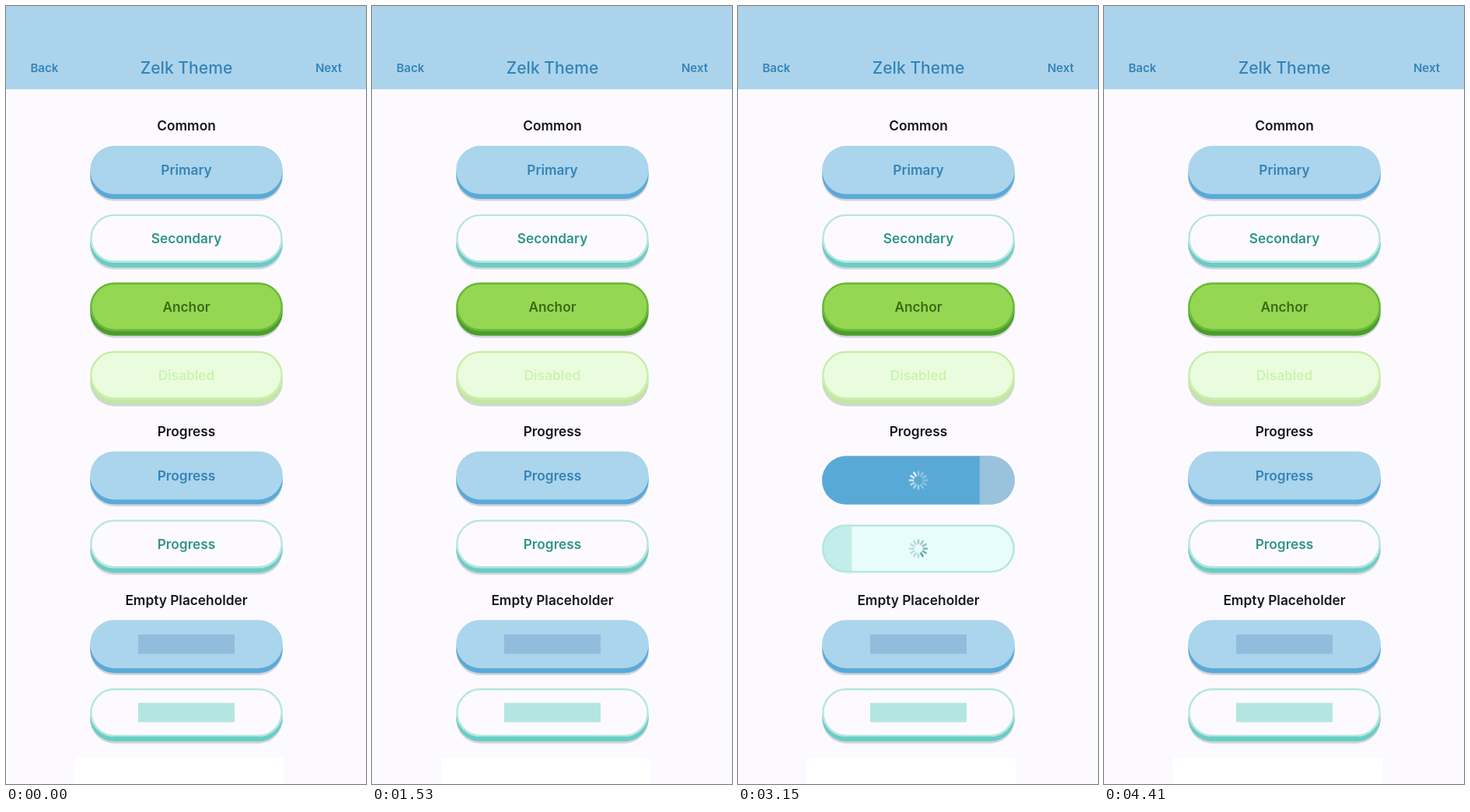
Animation, 463 px wide and 1000 px high, one loop 4.44 s. Source, as an HTML page:

```html
<!DOCTYPE html>
<html lang="en">
<head>
<meta charset="utf-8">
<title>Button theme</title>
<style>
@property --press { syntax: "<number>"; inherits: true; initial-value: 0; }
@property --label { syntax: "<number>"; inherits: true; initial-value: 1; }

html, body { margin: 0; width: 100%; height: 100%; overflow: hidden; background: #fcfafe; }
svg { display: block; width: 100%; height: 100%; }
text { font: 600 17.3px Inter, "Open Sans", sans-serif; text-anchor: middle; }
.nav { fill: #3583b8; font-size: 15px; }
.title { font-size: 21.1px; font-weight: 500; }
.heading { fill: #17171b; }

.tap { animation: tap 4440ms var(--at) infinite; }
.hold { animation: hold 4440ms var(--at) infinite, label 4440ms var(--at) linear infinite; }

.face { transform: translateY(calc(var(--press) * 6.2px)); }
.shade { transform: translateY(calc(var(--press) * -2.6px)); }
.tint { opacity: var(--press); }
.label { transform: scale(var(--label)); opacity: var(--label); }
.bar { opacity: 0; transform: scaleX(0); animation: fill 4440ms var(--at) linear infinite; }
.spinner { opacity: 0; animation: show 4440ms var(--at) linear infinite; }
.spokes { animation: spin 4440ms var(--at) steps(54) infinite; }

@keyframes tap {
  0% { --press: 0; animation-timing-function: ease-out; }
  2.03%, 3.38% { --press: 1; animation-timing-function: ease-out; }
  5.86%, 100% { --press: 0; }
}
@keyframes hold {
  0% { --press: 0; animation-timing-function: ease-out; }
  2.03%, 38.74% { --press: 1; animation-timing-function: ease-out; }
  42.8%, 100% { --press: 0; }
}
@keyframes label {
  0%, 3.15% { --label: 1; }
  6.53%, 30.4% { --label: 0; }
  34.23% { --label: 1.07; }
  36.5% { --label: .985; }
  38.3%, 100% { --label: 1; }
}
@keyframes fill {
  0%, 7.09% { opacity: 1; transform: scaleX(0); }
  25.9% { opacity: 1; transform: scaleX(.278); animation-timing-function: ease-out; }
  29.95% { opacity: 1; transform: scaleX(1); }
  34.7%, 100% { opacity: 0; transform: scaleX(1); }
}
@keyframes show {
  0%, 3.6% { opacity: 0; }
  7.09%, 29.95% { opacity: 1; }
  32%, 100% { opacity: 0; }
}
@keyframes spin { to { transform: rotate(4.5turn); } }
</style>
</head>
<body>
<svg id="stage" viewBox="0 0 463 1000" preserveAspectRatio="none">
  <defs><clipPath id="pill"><rect x="-123.8" y="-31" width="247.6" height="62" rx="31"/></clipPath></defs>
  <rect width="463" height="1000" fill="#fcfafe"/>
  <rect width="463" height="107" fill="#abd4ec"/>
  <rect x="89" y="966" width="269" height="34" fill="#fff"/>
  <text class="nav" x="49.3" y="85.3">Back</text>
  <text class="nav title" x="232" y="87">Zelk Theme</text>
  <text class="nav" x="415" y="85.3">Next</text>
  <text class="heading" x="232" y="160.3">Common</text>
  <text class="heading" x="232" y="553.2">Progress</text>
  <text class="heading" x="232" y="769.8">Empty Placeholder</text>
</svg>
<script>
const primary = { face: '#aad5ec', base: '#5aa9d8', text: '#3583b8', active: '#95bdde',
  bar: '#59a9d6', spin: '#fff', blank: '#91bcde' };
const secondary = { face: '#fcfafe', border: '#b5e6e2', base: '#69cdc4', text: '#2f948a',
  active: '#e7fdfb', bar: '#c3edea', spin: '#4f979c', blank: '#b3e6e2' };
const anchor = { face: '#95d752', border: '#68b93a', base: '#4c9d2c', text: '#3b6b16', active: '#85c945' };
const disabled = { face: '#e9fdde', border: '#c9eea9', base: '#c1e6a5', text: '#cdf3ae' };

const buttons = [
  { y: 210.8, skin: primary, text: 'Primary', mode: 'tap', at: 250 },
  { y: 298.7, skin: secondary, text: 'Secondary', mode: 'tap', at: 720 },
  { y: 386.6, skin: anchor, text: 'Anchor', mode: 'tap', at: 1270 },
  { y: 474.6, skin: disabled, text: 'Disabled' },
  { y: 603.4, skin: { ...primary, active: '#9bc2dc' }, text: 'Progress', mode: 'hold', at: 1900 },
  { y: 691.3, skin: secondary, text: 'Progress', mode: 'hold', at: 2372 },
  { y: 820.2, skin: primary },
  { y: 908.1, skin: secondary }
];

const pill = (fill, dy = 0, cls = '') =>
  `<rect class="${cls}" x="-123.8" y="${dy - 31}" width="247.6" height="62" rx="31" fill="${fill}"/>`;

const outline = color =>
  `<rect x="-122.6" y="-29.8" width="245.2" height="59.6" rx="29.8" fill="none" stroke="${color}" stroke-width="2.4"/>`;

const bar = color =>
  `<g clip-path="url(#pill)"><g transform="translate(-123.8 0)">
    <rect class="bar" y="-31" width="247.6" height="62" fill="${color}"/></g></g>`;

function spinner(color) {
  const head = 8;
  let spokes = '';
  for (let i = 0; i < 12; i++) {
    const alpha = Math.max(.35, 1 - i * .11);
    spokes += `<path d="M0-6.6V-11.3" transform="rotate(${(head - i) * 30})" opacity="${alpha}"/>`;
  }
  return `<g class="spinner"><g class="spokes" stroke="${color}" stroke-width="2.3" stroke-linecap="round">${spokes}</g></g>`;
}

function button({ y, skin, text, mode = '', at = 0 }) {
  const busy = mode === 'hold';
  const content = text
    ? `<text class="label" y="6.3" fill="${skin.text}" style="transform-origin:0 0">${text}</text>`
    : `<rect x="-62" y="-12.4" width="124" height="24.8" fill="${skin.blank}"/>`;
  return `<g transform="translate(232 ${y})"><g class="${mode}" style="--at:${at}ms">
    ${pill('#d5d4dc', 8.8, 'shade')}
    ${pill(skin.base, 6.2)}
    <g class="face">
      ${pill(skin.face)}
      ${mode ? pill(skin.active, 0, 'tint') : ''}
      ${busy ? bar(skin.bar) : ''}
      ${skin.border ? outline(skin.border) : ''}
      ${content}
      ${busy ? spinner(skin.spin) : ''}
    </g></g></g>`;
}

document.getElementById('stage').insertAdjacentHTML('beforeend', buttons.map(button).join(''));
</script>
</body>
</html>
```
